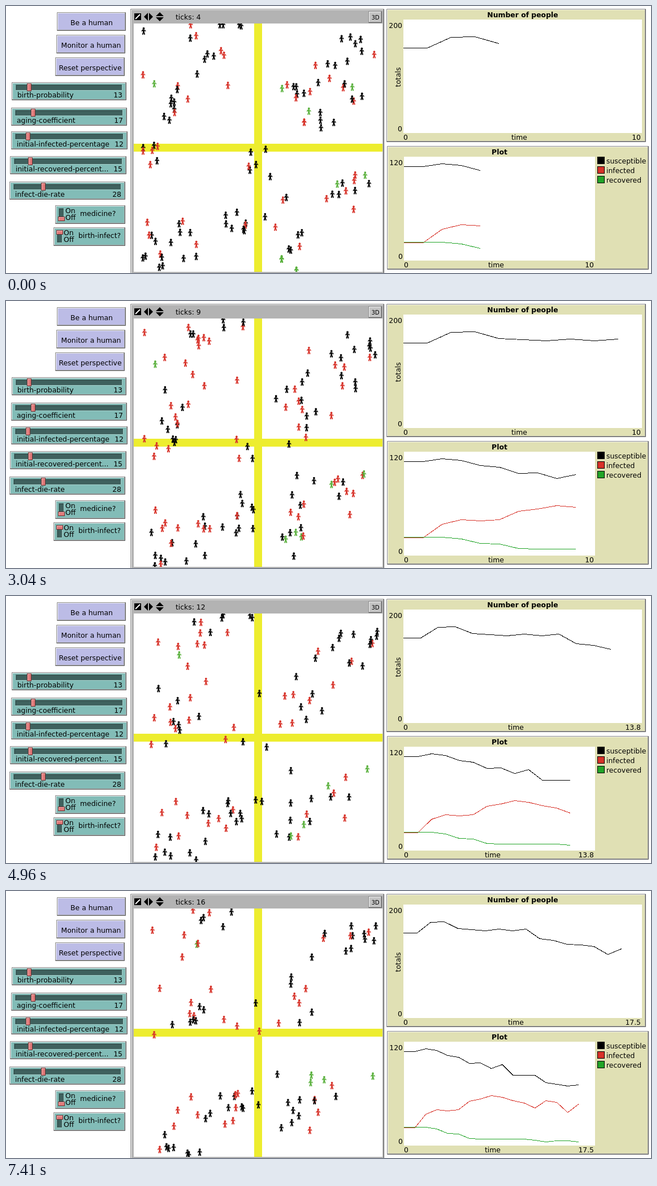
Write an HTML page that moves like this. It is 1141x473 px and loops after 7990 ms.

```html
<!DOCTYPE html>
<html>
<head>
<meta charset="utf-8">
<style>
html, body { margin: 0; width: 100%; height: 100%; overflow: hidden; background: #fff; }
svg { display: block; }
text { font: 12.4px "DejaVu Sans", sans-serif; white-space: pre; }
.bold { font-weight: bold; }
.small { font-size: 10px; }
.end { text-anchor: end; }
.mid { text-anchor: middle; }
polyline { fill: none; stroke-width: 1; shape-rendering: crispEdges; }
</style>
</head>
<body>
<svg id="stage" width="1141" height="473">
  <defs>
    <clipPath id="world"><rect x="226" y="31" width="440" height="440"/></clipPath>
    <g id="person" transform="scale(.0444) translate(-150 -150)">
      <circle cx="150" cy="45" r="42"/>
      <path d="M127 79h45v15h-45zM105 90l15 105-30 90 15 15h30l15-75 15 75h30l15-15-30-90 15-105zM195 90l45 60-15 30-60-75zM105 90l-45 60 15 30 60-75z"/>
    </g>
  </defs>
</svg>
<script>
const BLACK = '#000', RED = '#d73229', GREEN = '#59b03c';
const LOOP = 7990, FIRST = 4, LAST = 16;
const svg = document.getElementById('stage');

// ---------- drawing helpers ----------
const rect = (x, y, w, h, fill, more = '') =>
  `<rect x="${x}" y="${y}" width="${w}" height="${h}" fill="${fill}" ${more}/>`;
const text = (x, y, s, cls = '', more = '') =>
  `<text x="${x}" y="${y}" class="${cls}" ${more}>${s}</text>`;
const line = (d, color, width = 1) =>
  `<path d="${d}" fill="none" stroke="${color}" stroke-width="${width}"/>`;

// Half of a frame: the top left or the bottom right edges of a box.
const topLeft = (x, y, w, h, color) => line(`M${x + .5} ${y + h}V${y + .5}H${x + w}`, color);
const bottomRight = (x, y, w, h, color) => line(`M${x} ${y + h - .5}H${x + w - .5}V${y}`, color);

const bevel = (x, y, w, h, fill) =>
  rect(x, y, w, h, fill) +
  topLeft(x - 1, y - 1, w + 1, h + 1, '#8c8c8c') + topLeft(x, y, w - 1, h - 1, '#f4f4f4') +
  bottomRight(x, y, w - 1, h - 1, '#a4a4a4') + bottomRight(x, y, w, h, '#5c5c5c');

const button = (x, y, w, label) =>
  bevel(x, y, w, 32, '#bcbce6') + text(x + w / 2, y + 22, label, 'mid');

const knob = (x, y, w, h) =>
  rect(x + .5, y + .5, w - 1, h - 1, '#e27b7b', 'stroke="#6b3030"') +
  topLeft(x + 1, y + 1, w - 2, h - 2, '#f4b4b4');

const slot = (x, y, w, h) =>
  rect(x, y, w, h, '#3f615e') + topLeft(x, y, w, h, '#5b8480') +
  topLeft(x + 1, y + 1, w - 2, h - 2, '#2c4543') + bottomRight(x, y, w, h, '#a5d0cb');

const slider = (x, y, w, at, label, value) =>
  bevel(x, y, w, 31, '#82bcb7') + slot(x + 6, y + 3, w - 13, 11) + knob(at, y + 1, 8, 14) +
  text(x + 9, y + 26, label) + text(x + w - 7, y + 26, value, 'end');

const toggle = (x, y, w, on, label) =>
  bevel(x, y, w, 32, '#82bcb7') + slot(x + 5, y + 4, 10, 23) + knob(x + 4, y + (on ? 4 : 19), 12, 8) +
  text(x + 17, y + 13, 'On') + text(x + 17, y + 25, 'Off') + text(x + 43, y + 18, label);

const plot = (id, { x, y, w, h, right, bottom, title, top }) =>
  bevel(x - 29, y - 18, right - x + 29, bottom - y + 18, '#e0e0b4') + rect(x, y, w, h, '#fff') +
  text(x + w / 2, y - 4, title, 'bold mid') +
  text(x - 2, y + 15, top, 'end') + text(x - 2, y + h - 3, 0, 'end') +
  text(x, y + h + 12, 0) + `<g id="${id}Axis"></g><g id="${id}Lines"></g>`;

// ---------- plots: the height of each curve at every tick ----------
const totals = [74, 74, 55, 54, 66, 68, 70, 67, 70, 67, 84, 87, 94, 95, 98, 112, 102];
const groups = [
  { color: BLACK, pen: '#000', name: 'susceptible', seen: .475,
    ys: [284, 284, 279, 282, 291, 294, 305, 304, 314, 307, 326, 326, 326, 339, 342, 345, 343] },
  { color: RED, pen: '#d73229', name: 'infected', seen: .62,
    ys: [419, 419, 395, 387, 389, 387, 372, 368, 362, 365, 371, 375, 384, 371, 374, 392, 377] },
  { color: GREEN, pen: '#22a428', name: 'recovered', seen: .58,
    ys: [418, 418, 418, 421, 429, 430, 438, 439, 439, 439, 439, 439, 441, 444, 442, 442, 444] }
];
const people = { x: 703, y: 24, w: 422, h: 201, right: 1132, bottom: 241, title: 'Number of people', top: 200 };
const health = { x: 704, y: 267, w: 338, h: 184, right: 1137, bottom: 467, title: 'Plot', top: 120 };

// ---------- static scene ----------
svg.innerHTML += [
  button(91, 12, 121, 'Be a human'),
  button(90, 52, 121, 'Monitor a human'),
  button(88, 92, 122, 'Reset perspective'),
  slider(11, 136, 202, 37, 'birth-probability', 13),
  slider(10, 181, 204, 44, 'aging-coefficient', 17),
  slider(10, 223, 205, 35, 'initial-infected-percentage', 12),
  slider(8, 267, 205, 39, 'initial-recovered-percent...', 15),
  slider(7, 312, 204, 62, 'infect-die-rate', 28),
  toggle(88, 354, 123, false, 'medicine?'),
  toggle(85, 393, 126, true, 'birth-infect?'),

  bevel(221, 6, 448, 480, '#b3b3b3'),
  rect(227, 13, 12, 12, '#000'), line('M229 23L237 15', '#fff', 2),
  '<path d="M251 12v14l-7-7zM253 12v14l7-7zM265 18h14l-7-7zM265 20h14l-7 7z"/>',
  bevel(642, 10, 23, 20, '#c4c4c4'), text(653.5, 24, '3D', 'small mid'),
  '<text id="ticks" x="300" y="24"></text>',
  rect(226, 31, 440, 440, '#fff'),
  rect(439, 31, 14, 440, '#eded2f'), rect(226, 244, 440, 14, '#eded2f'),
  '<g id="crowd" clip-path="url(#world)"></g>',

  plot('people', people),
  text(0, 0, 'totals', 'mid', 'transform="translate(698 126) rotate(-90)"'),
  plot('health', health),
  ...groups.map((g, i) => rect(1046.5, 267.5 + 17 * i, 12, 12, g.pen, 'stroke="#000"') +
    text(1062, 279 + 17 * i, g.name))
].join('');

// ---------- the population ----------
let seed = 20;
function random() {
  seed = seed + 0x6D2B79F5 | 0;
  let t = Math.imul(seed ^ seed >>> 15, 1 | seed);
  t = t + Math.imul(t ^ t >>> 7, 61 | t) ^ t;
  return ((t ^ t >>> 14) >>> 0) / 4294967296;
}
const pick = list => list[Math.floor(random() * list.length)];
const clamp = (v, lo, hi) => Math.min(Math.max(v, lo), hi);

// Crowded places at the start: centre, radius, number of people.
const clusters = [
  [250, 90, 50, 6], [365, 60, 60, 13], [350, 170, 60, 7], [550, 150, 70, 26], [610, 110, 60, 12],
  [285, 190, 25, 6], [255, 265, 25, 8], [445, 275, 40, 7], [610, 325, 50, 14],
  [490, 375, 45, 9], [400, 385, 28, 8], [285, 415, 60, 22], [520, 445, 45, 6]];
// Places where people gather later.
const spots = [[415, 385], [525, 385], [375, 220], [590, 60], [640, 75], [340, 45], [480, 215]];

const newcomer = (x, y, radius) => {
  const turn = random() * 2 * Math.PI, r = radius * Math.sqrt(random()), dice = random();
  return {
    x: clamp(x + r * Math.cos(turn), 229, 663),
    y: clamp(y + r * Math.sin(turn), 33, 468),
    color: dice < .28 ? RED : dice < .37 ? GREEN : BLACK
  };
};

// One step in any direction with a slight drift; nobody walks through a wall.
function walk(p) {
  const away = ([x, y]) => Math.hypot(x - p.x, y - p.y);
  const spot = spots.reduce((a, b) => away(b) < away(a) ? b : a);
  const turn = random() * 2 * Math.PI, pull = 4 / Math.max(away(spot), 40);
  const x = p.x + 12 * Math.cos(turn) + (spot[0] - p.x) * pull;
  const y = p.y + 12 * Math.sin(turn) + (spot[1] - p.y) * pull;
  const inside = x > 229 && x < 663 && y > 33 && y < 469;
  return inside ? { ...p, x, y } : p;
}

// Infection, birth and death bring each group to the size its curve shows.
function settle(crowd, tick) {
  const next = crowd.map(p => ({ ...p }));
  const all = color => next.filter(p => p.color === color);
  for (const i of [1, 0, 2]) {
    const { color, ys, seen } = groups[i];
    const want = Math.round((450 - ys[tick]) * seen);
    while (all(color).length > want) next.splice(next.indexOf(pick(all(color))), 1);
    while (all(color).length < want) {
      if (color === RED) pick(all(BLACK)).color = RED;
      else next.push({ ...pick(all(color)) });
    }
  }
  return next;
}

const start = clusters.flatMap(([x, y, radius, count]) =>
  Array.from({ length: count }, () => newcomer(x, y, radius)));
const history = { [FIRST]: { settled: settle(start, FIRST) } };
for (let t = FIRST + 1; t <= LAST; t++) {
  const moved = history[t - 1].settled.map(walk);
  history[t] = { moved, settled: settle(moved, t) };
}

// ---------- timing ----------
const starts = [480, 1110, 1730, 2370, 3000, 3600, 4240, 4870, 5490, 6100, 6730, 7360];
const SETTLE = 80;
const lagAt = tick => tick > 8 ? 40 : 0;   // later on the plots trail the world
const rangeAt = tick => tick <= 10 ? 10 : tick <= 13 ? 13.8 : 17.5;
const $ = id => document.getElementById(id);

function curve(p, ys, tick, color) {
  const points = ys.slice(0, tick + 1).map((y, i) => `${p.x + i / rangeAt(tick) * p.w},${y + .5}`);
  return `<polyline points="${points.join(' ')}" stroke="${color}"/>`;
}

function axis(p, max) {
  const base = p.y + p.h + 12;
  return text(p.x + p.w / 2 - (max > 10 ? 12 : 6), base, 'time', 'mid') +
    text(p.x + p.w - 2, base, max, 'end');
}

function draw(worldTick, plotTick, done) {
  const { moved, settled } = history[worldTick];
  $('crowd').innerHTML = (done ? settled : moved).map(p =>
    `<use href="#person" x="${p.x.toFixed(1)}" y="${p.y.toFixed(1)}" fill="${p.color}"/>`).join('');
  $('ticks').textContent = 'ticks: ' + plotTick;
  $('peopleAxis').innerHTML = axis(people, rangeAt(plotTick));
  $('healthAxis').innerHTML = axis(health, rangeAt(worldTick));
  $('peopleLines').innerHTML = curve(people, totals, plotTick, '#000');
  $('healthLines').innerHTML = groups.map(g => curve(health, g.ys, plotTick, g.pen)).join('');
}

let shown = '';
const begin = performance.now();
function frame() {
  const now = (performance.now() - begin) % LOOP;
  const step = starts.filter(at => at <= now).length;
  const since = step ? now - starts[step - 1] : LOOP;
  const world = FIRST + step;
  const plots = since < lagAt(world) ? world - 1 : world;
  const done = since >= SETTLE;
  const key = [world, plots, done].join();
  if (key !== shown) {
    shown = key;
    draw(world, plots, done);
  }
  requestAnimationFrame(frame);
}
frame();
</script>
</body>
</html>
```
